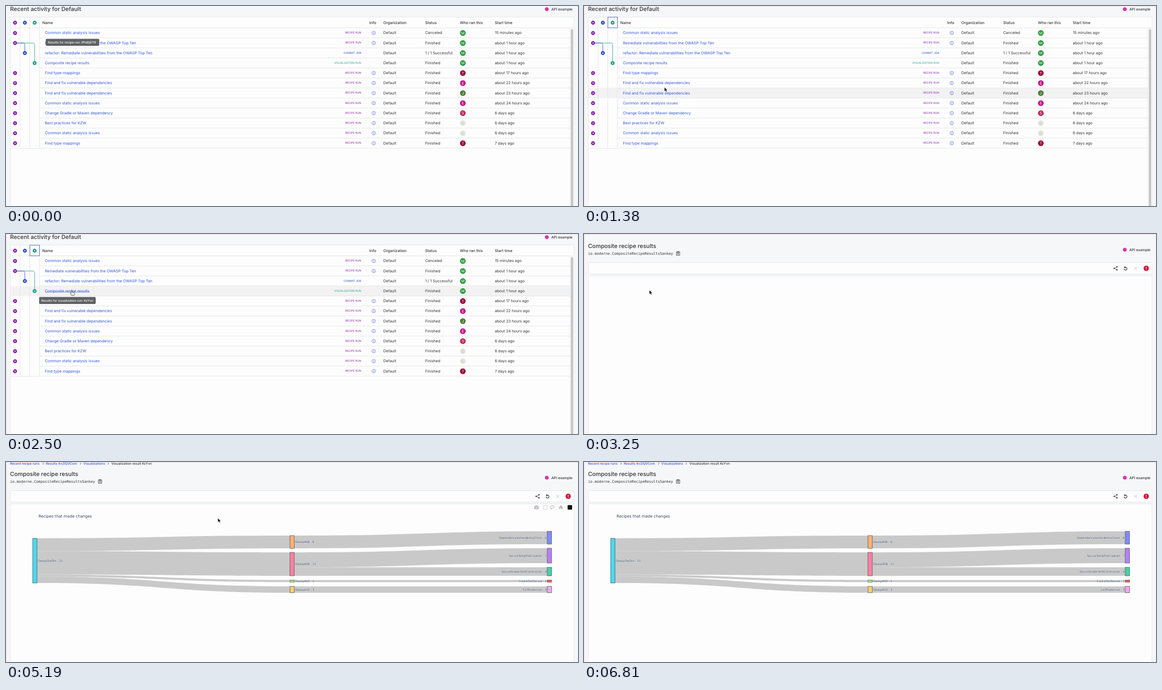
Write an HTML page that moves like this. It is 1265 px wide and 443 px high and loops after 6.87 s.

```html
<!DOCTYPE html>
<html lang="en">
<head>
<meta charset="utf-8">
<title>Recent activity</title>
<style>
html, body { margin: 0; width: 100%; height: 100%; overflow: hidden; background: #f6f7f9; }
svg { display: block; width: 1265px; height: 443px; font: 8.4px Inter, sans-serif; fill: #333; text-rendering: geometricPrecision; }
.h1 { font-size: 12.65px; font-weight: 500; }
.api { font-size: 7.9px; font-weight: 500; }
.th { font-weight: 500; }
.link { fill: #3455dc; }
.chip { font-size: 6px; text-anchor: end; }
.initial { font-size: 8px; text-anchor: middle; fill: #fff; }
.crumb { font-size: 7.25px; font-weight: 500; }
.mono { font: 8px "DejaVu Sans Mono", monospace; }
.tip { font-size: 6.85px; font-weight: 500; fill: #fff; }
.panel { fill: #fdfdfd; stroke: #e4e5e8; }
.line { fill: none; stroke: #e2e3e6; }
.icon { fill: none; stroke: #444; stroke-width: 1; }
.plot { font: 6.1px "DejaVu Sans", sans-serif; fill: #2a3f5f; }
.plot .name { paint-order: stroke; stroke: #fff; stroke-opacity: .55; stroke-width: 1px; }
.flow { fill: #c9c9c9; }
.node { stroke: #444; stroke-width: .8; }
.hover { font: 8px "Liberation Sans", Arial, sans-serif; }

.anim, #list, #result, #bar { animation: 6.87s step-end infinite; }
#list { animation-name: list; }
#result { animation-name: result; }
#bar { animation-name: bar; fill: #f2f2f3; }
.frame { animation-name: frame; }
.focus { animation-name: focus; }
.tip1 { animation-name: tip1; }
.tip2 { animation-name: tip2; }
.under { animation-name: hand; }
.hand { animation-name: hand; }
.arrow { animation-name: arrow; }
.head { animation-name: head; }
.loaded { animation-name: loaded; }
.modebar { animation-name: modebar; }
.hot0 { animation-name: hot0; }
.hot1 { animation-name: hot1; }
.hot2 { animation-name: hot2; }
.cursor { animation-name: move; animation-timing-function: linear; }

@keyframes list { 0% { visibility: visible; } 46.4%, 100% { visibility: hidden; } }
@keyframes result { 0% { visibility: hidden; } 46.4%, 100% { visibility: visible; } }
@keyframes head { 0% { opacity: 0; } 47.28%, 100% { opacity: 1; } }
@keyframes loaded { 0% { opacity: 0; } 50.9%, 100% { opacity: 1; } }
@keyframes frame { 0% { opacity: 0; } .86%, 100% { opacity: 1; } }
@keyframes focus { 0% { opacity: 0; } .86% { opacity: 1; } 43.65%, 100% { opacity: 0; } }
@keyframes tip1 {
  0% { opacity: 1; }
  .86% { opacity: 1; animation-timing-function: linear; }
  4%, 100% { opacity: 0; }
}
@keyframes tip2 {
  0% { opacity: 0; }
  31% { opacity: 0; animation-timing-function: linear; }
  34.5% { opacity: 1; }
  43.65%, 100% { opacity: 0; }
}
@keyframes hand { 0% { opacity: 0; } 25.6% { opacity: 1; } 46.4%, 100% { opacity: 0; } }
@keyframes arrow { 0% { opacity: 1; } 25.6% { opacity: 0; } 46.4%, 100% { opacity: 1; } }
@keyframes bar {
  0% { opacity: 0; transform: translateY(244.2px); }
  12.52% { opacity: 1; transform: translateY(244.2px); }
  13.97% { opacity: 1; transform: translateY(222px); }
  15.28% { opacity: 1; transform: translateY(199.8px); }
  16.59% { opacity: 1; transform: translateY(177.6px); }
  17.9% { opacity: 1; transform: translateY(155.4px); }
  19.07% { opacity: 1; transform: translateY(133.2px); }
  20.96% { opacity: 1; transform: translateY(111px); }
  22.27% { opacity: 1; transform: translateY(88.8px); }
  24.75%, 46.4% { opacity: 1; transform: translateY(66.6px); }
  100% { opacity: 0; transform: translateY(66.6px); }
}
@keyframes modebar {
  0% { opacity: 0; }
  50.9% { opacity: .22; animation-timing-function: ease-out; }
  55.3% { opacity: 1; }
  94.6% { opacity: 1; animation-timing-function: linear; }
  99%, 100% { opacity: 0; }
}
@keyframes hot0 { 0% { opacity: 0; } 81.5% { opacity: 1; } 89.9%, 100% { opacity: 0; } }
@keyframes hot1 { 0% { opacity: 0; } 90.1% { opacity: 1; } 91.2%, 100% { opacity: 0; } }
@keyframes hot2 { 0% { opacity: 0; } 91.2% { opacity: 1; } 91.8%, 100% { opacity: 0; } }
@keyframes move {
  0%, 5.5% { transform: translate(262px, 448px); }
  10.04% { transform: translate(226px, 352px); }
  20.09% { transform: translate(178px, 180px); animation-timing-function: cubic-bezier(.2, .7, .4, 1); }
  31%, 69.1% { transform: translate(144.5px, 124px); }
  69.14% { transform: translate(144.5px, 124px); animation-timing-function: cubic-bezier(.45, .05, .8, .75); }
  75.55% { transform: translate(468px, 124px); }
  79.18% { transform: translate(612px, 142px); animation-timing-function: cubic-bezier(.2, .6, .4, 1); }
  83.7% { transform: translate(650px, 168.5px); }
  88.21% { transform: translate(650px, 168.5px); animation-timing-function: cubic-bezier(.4, 0, .9, .9); }
  94.6%, 100% { transform: translate(690px, 448px); }
}
</style>
</head>
<body>
<svg viewBox="0 0 1265 443" xmlns="http://www.w3.org/2000/svg">
  <g id="list"></g>
  <g id="result"></g>
  <path class="anim frame" d="M0 .5H1265M.5 0V443" fill="none" stroke="#fbd9d3"/>
  <g class="anim cursor">
    <path class="anim arrow" d="M0 0V9.6L2.2 7.6 3.7 11 5.4 10.3 3.9 7.1H6.8Z" fill="#000" stroke="#fff" stroke-width=".7"/>
    <path class="anim hand" d="M-.6 1.2Q.5 0 1.5 1.2V5Q2.4 4.2 3.4 5.2 4.4 4.6 5.2 5.6 6.4 5.2 6.8 6.6V9Q6.6 10.6 5.8 12H.6Q-.6 9.6-2.4 7.8-2.6 6.2-.6 7.3Z" fill="#fff" stroke="#222" stroke-width=".9"/>
  </g>
</svg>
<script>
const PURPLE = '#8f22b0', BLUE = '#3252c8', TEAL = '#1fa784';
const PITCH = 22.2;
const get = id => document.getElementById(id);
const text = (x, y, s, cls = '', more = '') => `<text x="${x}" y="${y}" class="${cls}" ${more}>${s}</text>`;
const rect = (x, y, w, h, more = '') => `<rect x="${x}" y="${y}" width="${w}" height="${h}" ${more}/>`;
const disc = (x, y, r, fill) => `<circle cx="${x}" cy="${y}" r="${r}" fill="${fill}"/>`;
const path = (d, more = 'class="icon"') => `<path d="${d}" ${more}/>`;
const dot = (x, y, color) => disc(x, y, 4.4, color) + disc(x, y, 1.2, '#fff');
const api = y => disc(1196, y, 4.3, '#d936a4') + text(1206, y + 2.9, 'API example', 'api');
const tip = (x, y, w, s, cls) => `<g class="anim ${cls}">` +
  rect(x, y, w, 15.5, 'rx="2.4" fill="#606163"') + text(x + 4.8, y + 10.1, s, 'tip') + '</g>';

// Activity table
const kinds = {
  r: ['RECIPE RUN', PURPLE, 20], c: ['COMMIT JOB', BLUE, 41.7], v: ['VISUALIZATION RUN', TEAL, 63.3]
};
const people = { M: '#2a983b', T: '#990a3a', E: '#c3158a', J: '#4d7f3b', S: '#c02759', C: '#e5e5dc' };
const rows = [
  ['Common static analysis issues', 'r', 'M', '15 minutes ago', 'Canceled'],
  ['Remediate vulnerabilities from the OWASP Top Ten', 'r', 'M', 'about 1 hour ago'],
  ['refactor: Remediate vulnerabilities from the OWASP Top Ten', 'c', 'M', 'about 1 hour ago', '1 / 1 Successful'],
  ['Composite recipe results', 'v', 'M', 'about 1 hour ago'],
  ['Find type mappings', 'r', 'T', 'about 17 hours ago'],
  ['Find and fix vulnerable dependencies', 'r', 'E', 'about 22 hours ago'],
  ['Find and fix vulnerable dependencies', 'r', 'J', 'about 23 hours ago'],
  ['Common static analysis issues', 'r', 'E', 'about 24 hours ago'],
  ['Change Gradle or Maven dependency', 'r', 'S', '6 days ago'],
  ['Best practices for KZW', 'r', 'C', '6 days ago'],
  ['Common static analysis issues', 'r', 'C', '6 days ago'],
  ['Find type mappings', 'r', 'T', '7 days ago']
];

function tableRow([name, kind, who, when, status = 'Finished'], i) {
  const y = 59.5 + PITCH * i, base = y + 2.9;
  const [label, color, x] = kinds[kind];
  const info = `<circle cx="813.2" cy="${y + .2}" r="3.8" fill="none" stroke="#4259e0" stroke-width=".8"/>` +
    path(`M813.2 ${y - .4}v2.6M813.2 ${y - 1.9}v.9`, 'stroke="#4259e0" stroke-width=".9"');
  return path(`M74 ${(y + 11.1).toFixed(1)}H1247`, 'class="line"') +
    text(86, base, name, 'link') +
    text(785.6, y + 1.6, label, 'chip', `fill="${color}"`) +
    (kind === 'r' ? info : '') +
    text(834.5, base, 'Default') + text(927, base, status) +
    disc(1010.3, y + .3, 6.3, people[who]) +
    text(1010.3, y + 3.2, who, 'initial', who === 'C' ? 'style="fill:#b9b9b0"' : '') +
    text(1081, base, when) + dot(x, y + .3, color);
}

const heads = [[80.5, 'Name'], [803.5, 'Info'], [834.5, 'Organization'], [927, 'Status'], [1004, 'Who ran this'], [1081, 'Start time']];

get('list').innerHTML =
  text(9, 11.4, 'Recent activity for Default', 'h1') + api(7) +
  rect(9.5, 24.5, 1246.5, 440, 'class="panel"') +
  rect(10, 48.4, 1237, PITCH, 'id="bar"') +
  path('M10 48.5H1256M31 25V315M52.5 25V315M74 25V315M10 315.3H74M1247.5 48V443', 'class="line"') +
  rect(1249.4, 51, 4.8, 410, 'rx="2.4" fill="#c2c2c3"') +
  heads.map(([x, s]) => text(x, 39.8, s, 'th')).join('') +
  Object.values(kinds).map(k => dot(k[2], 37, k[1])).join('') +
  path('M24 82H59Q63.3 82 63.3 86.5V122', `fill="none" stroke="${TEAL}"`) +
  path('M24 82H37.5Q41.7 82 41.7 86.5V100', `fill="none" stroke="${BLUE}"`) +
  rows.map(tableRow).join('') +
  path('M86 128.6H185', 'class="anim under" stroke="#3455dc" stroke-width=".8"') +
  rect(52.8, 24.7, 21.2, 23.6, 'class="anim focus" fill="none" stroke="#4458b0"') +
  tip(88, 72.8, 118.2, 'Results for recipe run: tPtd0jET9', 'tip1') +
  tip(73.2, 139.6, 125.2, 'Results for visualization run: KcYvn', 'tip2');

// Sankey chart: columns start at these x positions
const COLS = [59, 628, 1197], NODE_W = 9.5, UNIT = 4.714;
const nodes = [
  [0, 169, 21, 'OwaspTopTen', '#4ad8f0'],
  [1, 163, 6, 'OwaspA06', '#fdb079'],
  [1, 200.2, 11, 'OwaspA08', '#fb80a4'],
  [1, 261.4, 1, 'OwaspA02', '#b9e08a'],
  [1, 275.4, 3, 'OwaspA10', '#fdcd72'],
  [2, 153.6, 6, 'DependencyVulnerabilityCheck', '#7f8cfa'],
  [2, 191, 7, 'SecureTempFileCreation', '#b681fa'],
  [2, 233.2, 4, 'SecureSnakeYamlConstructor', '#43d2a8'],
  [2, 261.4, 1, 'CookieSetSecure', '#ef6350'],
  [2, 275.4, 3, 'CsrfProtection', '#f1a7f7']
];
const links = [[0, 1], [0, 2], [0, 3], [0, 4], [1, 5], [2, 6], [2, 7], [3, 8], [4, 9]];
const used = {};
const title = n => `${n[3]} - ${n[2]}`;

const flows = links.map(([a, b]) => {
  const from = nodes[a], to = nodes[b];
  const n = Math.min(from[2], to[2]), h = n * UNIT;
  const y0 = from[1] + (used[a] || 0) * UNIT, y1 = to[1];
  used[a] = (used[a] || 0) + n;
  const x0 = COLS[from[0]] + NODE_W, x1 = COLS[to[0]], m = (x0 + x1) / 2;
  const d = `M${x0} ${y0}C${m} ${y0} ${m} ${y1} ${x1} ${y1}V${y1 + h}C${m} ${y1 + h} ${m} ${y0 + h} ${x0} ${y0 + h}Z`;
  return { d, from, to, n, mid: (y0 + y1 + h) / 2 };
});

function node([col, y, n, , color]) {
  return rect(COLS[col], y, NODE_W, n * UNIT, `class="node" fill="${color}"`);
}
function label(n) {
  const right = n[0] === 2, x = COLS[n[0]] + (right ? -1.5 : 11.2);
  return text(x, n[1] + n[2] * UNIT / 2 + 2.2, title(n), 'name', right ? 'text-anchor="end"' : '');
}
const hot = (f, i) => path(f.d, `class="anim hot${i}" fill="#959595"`);
function hoverLabel(f, i) {
  const w = [151, 130, 149][i], y = f.mid, x = 921 + w;
  return `<g class="anim hover hot${i}">` +
    path(`M917.5 ${y}l3.5-3V${y - 11.3}h${w}V${y + 11.3}h-${w}V${y + 3}Z`, 'fill="#343434" stroke="#ddd" stroke-width=".6"') +
    rect(x, y - 11.3, 19, 22.6, 'fill="#e1e1e1"') +
    text(923, y - 2.2, 'source: ' + title(f.from), '', 'fill="#fff"') +
    text(923, y + 8, 'target: ' + title(f.to), '', 'fill="#fff"') +
    text(x + 2, y - 2.2, f.n.toFixed(2), '', 'fill="#333"') + '</g>';
}

const modebar = '<g class="anim modebar" fill="#b8b8bb">' +
  path('M1168.4 97.4H1170.6L1171.4 96H1174.8L1175.6 97.4H1177.8V104.6H1168.4Z', '') + disc(1173.1, 100.8, 2.1, '#fdfdfd') + disc(1173.1, 100.8, 1.2, '#b8b8bb') +
  rect(1188.7, 96.6, 8.4, 8, 'fill="none" stroke="#b8b8bb" stroke-dasharray="1.8 1"') +
  path('M1205 103.2Q1202 100 1205 97.6 1208.5 95.6 1211.4 97.8 1213 100.6 1210 102.2 1207 103.2 1205.6 101.8 1206.8 103.8 1205.4 105', 'fill="none" stroke="#b8b8bb" stroke-width="1.1"') +
  path('M1222.4 100.8L1227.3 96 1232.2 100.8H1230.9V104.6H1228.4V101.8H1226.2V104.6H1223.7V100.8Z', '') +
  rect(1242, 95.4, 10, 10, 'rx="1" fill="#111"') + '</g>';

const crumbs = [[9, 'Recent recipe runs'], [88, 'Results 4vZIQVCsm'], [171, 'Visualizations'], [233, 'Visualization result KcYvn']];
const hots = flows.slice(4, 7);

get('result').innerHTML =
  rect(9.5, 63.5, 1246.5, 25, 'class="panel"') +
  rect(9.5, 92.5, 1246.5, 380, 'class="panel"') +
  '<g class="anim head">' +
  text(9, 30.8, 'Composite recipe results', 'h1') +
  text(9, 45.8, 'io.moderne.CompositeRecipeResultsSankey', 'mono') +
  path('M204.3 39.6H211.8V47.2H204.3ZM206.3 39.6V41H209.8V39.6M206 42.8H210M206 44.8H210M207 38.6H209') +
  api(34.8) +
  path('M1178.6 72.8L1172.6 76 1178.6 79.2') +
  disc(1178.6, 72.6, 1.6, '#444') + disc(1172.4, 76, 1.6, '#444') + disc(1178.6, 79.3, 1.6, '#444') +
  path('M1195 73.6H1198A3.2 3.2 0 1 1 1194.4 77', 'fill="none" stroke="#333" stroke-width="1.2"') +
  path('M1197 70.9V76.3L1194 73.6Z', 'fill="#333"') +
  path('M1216.8 72.7L1223.4 79.3M1223.4 72.7L1216.8 79.3', 'stroke="#cdced1" stroke-width="1.1"') +
  disc(1243.4, 76, 5.9, '#d3143f') +
  path('M1243.4 72.8V76.8M1243.4 78V79.3', 'stroke="#fff" stroke-width="1.3"') +
  '</g><g class="anim loaded">' +
  crumbs.map(([x, s], i) => text(x, 6.2, s, i < 3 ? 'crumb link' : 'crumb')).join('') +
  [81, 163.8, 225].map(x => path(`M${x} 1.4l2.2 2.2-2.2 2.2`)).join('') +
  '<g class="plot">' +
  text(72, 122.6, 'Recipes that made changes', '', 'style="font-size:8.5px"') +
  flows.map(f => path(f.d, 'class="flow"')).join('') +
  hots.map(hot).join('') +
  nodes.map(node).join('') + nodes.map(label).join('') +
  hots.map(hoverLabel).join('') +
  '</g></g>' + modebar;
</script>
</body>
</html>
```
